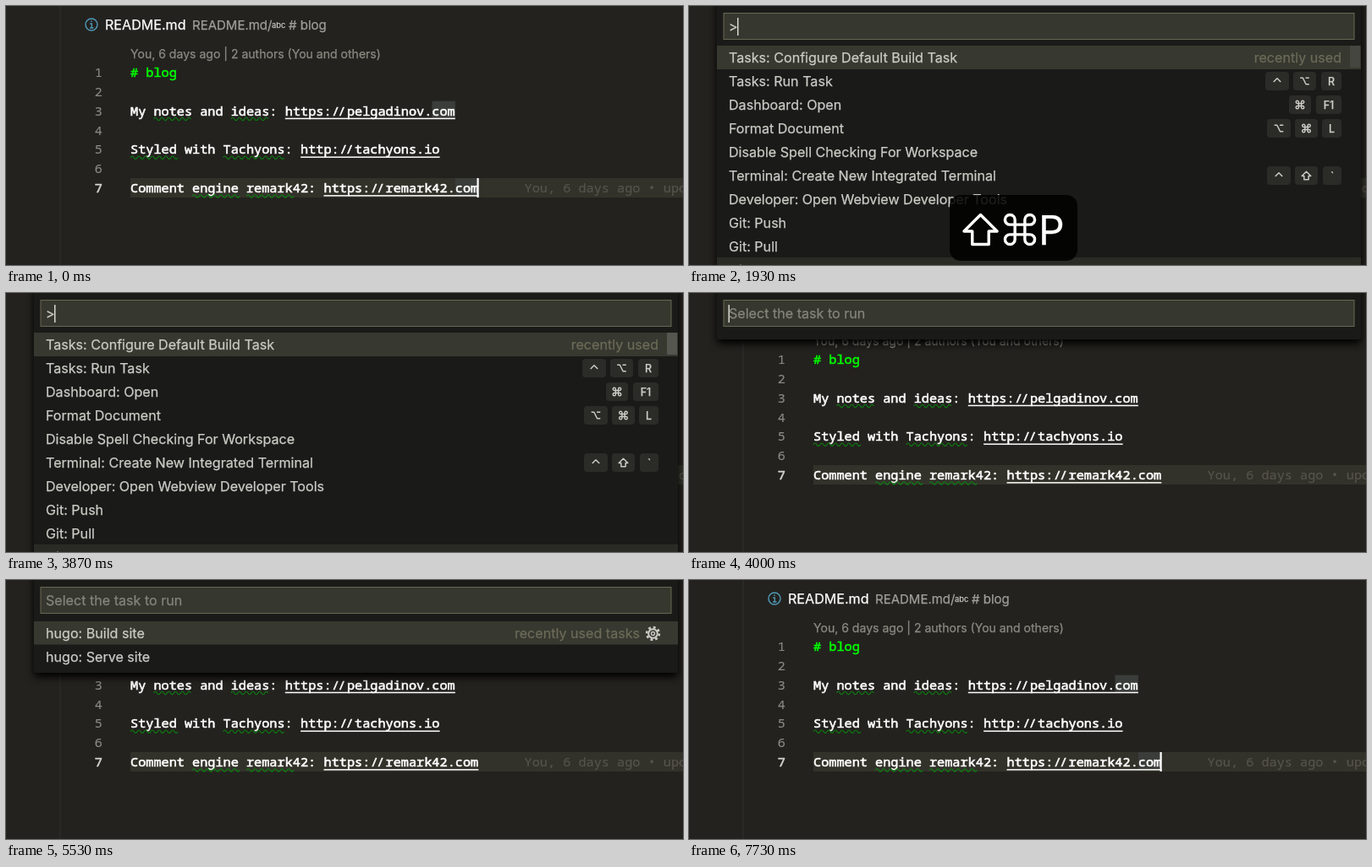
These frames come from a looping animation (800 by 307 pixels, 8000 ms). An HTML page:

```html
<!DOCTYPE html>
<html lang="en">
<head>
<meta charset="utf-8">
<title>Editor tasks</title>
<style>
html, body { margin: 0; width: 100%; height: 100%; overflow: hidden; background: #23221e; }
svg { display: block; width: 800px; height: 307px; }
text {
  font: 16.1px Inter, "Open Sans", sans-serif; white-space: pre;
  color: #cccbc6; fill: currentColor; stroke: currentColor; stroke-width: .25;
}
.mono text {
  font: 15.23px "Noto Sans Mono", "DejaVu Sans Mono", monospace;
  color: #fff; stroke-width: .6;
}
.mono .num { color: #8b8a84; stroke-width: .15; }
.mono .active { color: #d5d4cf; stroke-width: .6; }
.mono .head { color: #00fa00; }
.mono .blame { color: #55544b; stroke-width: .2; }
.title { color: #fff; }
.crumb { font-size: 15px; color: #a09f99; }
.abc { font-size: 9.3px; color: #c5c4bf; }
.lens { font-size: 14.05px; color: #8b8a83; }
.dim { color: #6c6a58; }
.hint { color: #85857b; }
.key { font-size: 12.5px; font-weight: 500; }
.big { font-size: 48px; color: #fff; }
.icon { fill: none; stroke: #cccbc6; stroke-linejoin: round; }
#keycast .icon { stroke: #fff; }
.panel { fill: #1a1b18; filter: drop-shadow(0 5px 5px #000); }
</style>
</head>
<body>
<svg id="stage" viewBox="0 0 800 307"></svg>
<script>
const CELL = 9.14, LEFT = 147, LOOP = 8000;
const colX = c => LEFT + c * CELL;
const baseY = line => 84 + (line - 1) * 22.85;

const text = (x, y, s, cls = '', anchor = 'start') =>
  `<text x="${x}" y="${y}" class="${cls}" text-anchor="${anchor}">${s}</text>`;
const rect = (x, y, w, h, fill, attrs = '') =>
  `<rect x="${x}" y="${y}" width="${w}" height="${h}" fill="${fill}" ${attrs}/>`;

// Editor pieces
const code = (line, s, cls) => text(LEFT, baseY(line), s, cls);
const squiggle = (line, col, len) => {
  const n = Math.round(len * CELL / 4);
  return `<path d="M${colX(col)} ${baseY(line) + 4.3}q2 -3.4 4 0${'t4 0'.repeat(n - 1)}"
    fill="none" stroke="#0a8210" stroke-width="1.1"/>`;
};
const link = (line, col, scheme, host) => {
  const x = colX(col), y = baseY(line), len = scheme.length + 3 + host.length;
  return text(x, y, `${scheme}:<tspan dx=".4">/</tspan><tspan dx="-1.8">/</tspan><tspan dx="1.4">${host}</tspan>`) +
    rect(x, y + 3, len * CELL, 1.5, '#fff');
};
const match = (line, col) => rect(colX(col), baseY(line) - 17, 3 * CELL, 20, '#3b3d3b');

const editor = `
  ${rect(0, 0, 800, 307, '#23221e')}
  ${rect(63.5, 0, 1, 307, '#31312d')}
  <circle cx="101" cy="22" r="7" fill="none" stroke="#519aba" stroke-width="1.4"/>
  <path d="M99.3 21H101.3V26M99 26H103.5M101 17.3V19" fill="none" stroke="#519aba" stroke-width="1.3"/>
  ${text(117, 28, 'README.md', 'title')}
  ${text(220, 28, 'README.md/', 'crumb')}
  ${text(314, 26, 'abc', 'abc')}
  ${text(334, 28, '# blog', 'crumb')}
  ${text(LEFT, 62, 'You, 6 days ago | 2 authors (You and others)', 'lens')}
  ${rect(LEFT, 204, 653, 23, '#33322a')}
  <g id="matches">${match(3, 39)}${match(7, 42)}</g>
  <g class="mono">
    ${[1, 2, 3, 4, 5, 6, 7].map(n =>
      text(114, baseY(n), n, n == 7 ? 'num active' : 'num', 'end')).join('')}
    ${code(1, '# blog', 'head')}
    ${code(3, 'My notes and ideas:')}
    ${code(5, 'Styled with Tachyons:')}
    ${code(7, 'Comment engine remark42:')}
    ${link(3, 20, 'https', 'pelgadinov.com')}
    ${link(5, 22, 'http', 'tachyons.io')}
    ${link(7, 25, 'https', 'remark42.com')}
    ${text(612.5, baseY(7), 'You, 6 days ago • update readme', 'blame')}
  </g>
  ${squiggle(3, 3, 5)}${squiggle(3, 13, 5)}
  ${squiggle(5, 0, 6)}${squiggle(5, 12, 8)}
  ${squiggle(7, 8, 6)}${squiggle(7, 15, 6)}
  ${rect(556.5, 204, 2.2, 23, '#fff', 'id="caret"')}`;

// Key symbols in a 24 unit box
const SYMBOLS = {
  cmd: 'M18 3a3 3 0 0 0-3 3v12a3 3 0 1 0 3-3H6a3 3 0 1 0 3 3V6a3 3 0 1 0-3 3h12a3 3 0 0 0 0-6z',
  shift: 'M12 3L22 13H17V21H7V13H2Z',
  opt: 'M2 5H8L15 19H22M14 5H22',
  ctrl: 'M4 14L12 6L20 14'
};
const symbol = (name, cx, cy, scale, width) =>
  `<path class="icon" d="${SYMBOLS[name]}" stroke-width="${width}"
    transform="translate(${cx} ${cy}) scale(${scale}) translate(-12 -12)"/>`;
const key = (name, x0, x1, cy) => {
  const cx = (x0 + x1) / 2;
  return rect(x0, cy - 11, x1 - x0, 22, '#2b2b28', 'rx="4"') +
    (SYMBOLS[name] ? symbol(name, cx, cy, .53, 2.8)
      : text(cx, cy + 4.5, name, 'key', 'middle'));
};

// Pick lists
const panel = h => rect(33, -10, 761, h + 10, '', 'class="panel" rx="3"') +
  rect(41, 8.5, 745, 31, '#36372e', 'stroke="#696853"');
const commands = ['Tasks: Configure Default Build Task', 'Tasks: Run Task', 'Dashboard: Open',
  'Format Document', 'Disable Spell Checking For Workspace',
  'Terminal: Create New Integrated Terminal', 'Developer: Open Webview Developer Tools',
  'Git: Push', 'Git: Pull', 'Git: Checkout to...'];

const palette = `<g id="palette">
  ${panel(330)}
  ${text(47, 30, '&gt;')}
  ${rect(57, 14, 1.5, 21, '#d8d8d0', 'id="paletteCaret"')}
  ${rect(33, 47, 761, 28, '#373930')}
  ${rect(33, 298, 761, 9, '#2a2b25')}
  ${commands.map((s, i) => text(47, 67 + i * 28, s)).join('')}
  ${text(771, 67, 'recently used', 'dim', 'end')}
  ${key('ctrl', 681, 709, 89)}${key('opt', 714, 741, 89)}${key('R', 747, 771, 89)}
  ${key('cmd', 709, 735, 117)}${key('F1', 741, 771, 117)}
  ${key('opt', 683, 711, 145)}${key('cmd', 716, 743, 145)}${key('L', 748, 771, 145)}
  ${key('ctrl', 683, 711, 201)}${key('shift', 716, 743, 201)}${key('`', 749, 771, 201)}
  ${rect(781, 47, 12, 26, '#555650', 'id="scrollbar"')}
</g>`;

const tasks = `<g id="tasks">
  <g id="emptyPanel">${panel(55)}</g>
  <g id="taskList">
    ${panel(110)}
    ${rect(33, 49, 761, 27.5, '#373930')}
    ${text(47, 68.5, 'hugo: Build site')}
    ${text(47, 96.5, 'hugo: Serve site')}
    ${text(749, 68.5, 'recently used tasks', 'dim', 'end')}
    <g class="icon">
      <circle cx="764.5" cy="63.5" r="7.4" stroke-width="2.6" stroke-dasharray="2.91"/>
      <circle cx="764.5" cy="63.5" r="5.3" stroke-width="2"/>
      <circle cx="764.5" cy="63.5" r="2" stroke-width="1.4"/>
    </g>
  </g>
  ${text(47, 30, 'Select the task to run', 'hint')}
  ${rect(46.5, 14, 1.5, 21, '#d8d8d0', 'id="taskCaret"')}
</g>`;

const keycast = `<g id="keycast">
  ${rect(308, 224, 151, 78, '#000', 'rx="13" fill-opacity=".86"')}
  ${symbol('shift', 344.5, 265, 1.95, 1.75)}
  ${symbol('cmd', 391, 265, 1.95, 1.75)}
  ${text(413, 283, 'P', 'big')}
</g>`;

document.getElementById('stage').innerHTML = editor + palette + tasks + keycast;

const el = id => document.getElementById(id);
const alpha = (id, v) => { el(id).style.opacity = v; };
const show = (id, on) => { el(id).style.display = on ? '' : 'none'; };
const blink = (t, start) => (t - start) % 1000 < 500;
const ramp = (t, a, b) => Math.min(1, Math.max(0, (t - a) / (b - a)));

const OPEN = 1870, PICK = 3930, LISTED = 4270, CLOSE = 5730;

function draw(t) {
  const inPalette = t >= OPEN && t < PICK;
  const inTasks = t >= PICK && t < CLOSE;
  const focused = !inPalette && !inTasks;
  show('matches', focused);
  show('caret', focused && blink(t, t < OPEN ? -130 : CLOSE));
  show('palette', inPalette);
  show('paletteCaret', blink(t, OPEN));
  alpha('scrollbar', ramp(t, OPEN, 2000));
  show('tasks', inTasks);
  show('emptyPanel', t < LISTED);
  show('taskList', t >= LISTED);
  show('taskCaret', t < 4000 || blink(t, 4000));
  show('keycast', t >= 1800 && t < 2600);
  alpha('keycast', 1 - ramp(t, 2200, 2600));
}

const begin = performance.now();
function tick() {
  draw((performance.now() - begin) % LOOP);
  requestAnimationFrame(tick);
}
tick();
</script>
</body>
</html>
```
